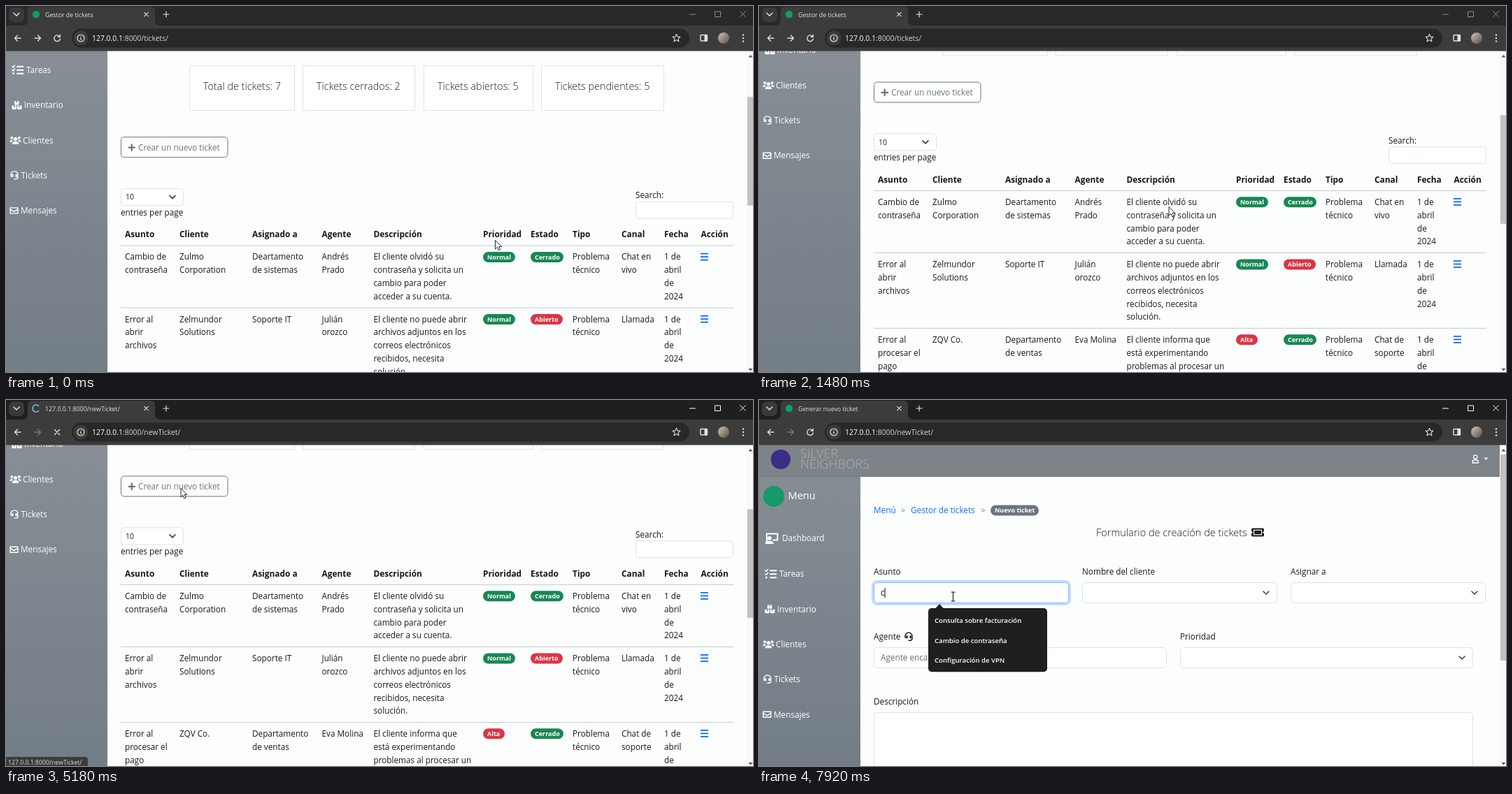
An HTML page for the animation above (7.99 s loop, 1068 by 524 pixels).

```html
<!DOCTYPE html>
<html lang="es">
<head>
<meta charset="utf-8">
<title>Gestor de tickets</title>
<style>
  html, body { margin: 0; width: 100%; height: 100%; overflow: hidden; background: #fcfefe; }
  svg { display: block; width: 100vw; height: 100vh; }
  text { font-family: 'Open Sans', 'Noto Sans', sans-serif; white-space: pre; }
  .line { fill: none; stroke-linecap: round; stroke-linejoin: round; }
</style>
</head>
<body>
<svg id="stage" viewBox="0 0 1068 524"></svg>
<script>
const LOOP = 7990, NOTCH = 78.7, LINE = 18.9;
const INK = '#15181b', GRAY = '#6c757d', BLUE = '#0d6efd', GREEN = '#198754', RED = '#dc3545', BORDER = '#dee2e6';

// Drawing helpers; text is placed by the middle of its capitals.
const text = (x, y, s, size = 11.75, weight = 400, fill = INK) =>
  `<text x="${x}" y="${y + size * .36}" font-size="${size}" font-weight="${weight}" fill="${fill}">${s}</text>`;
const rect = (x, y, w, h, fill, r = 0, extra = '') =>
  `<rect x="${x}" y="${y}" width="${w}" height="${h}" rx="${r}" fill="${fill}" ${extra}/>`;
const line = (d, color, w = 1.2) => `<path class="line" d="${d}" stroke="${color}" stroke-width="${w}"/>`;
const shape = (d, fill) => `<path d="${d}" fill="${fill}"/>`;
const circle = (x, y, r, fill) => `<circle cx="${x}" cy="${y}" r="${r}" fill="${fill}"/>`;
const group = (id, body) => `<g id="${id}">${body}</g>`;
const at = (x, y, body) => `<g transform="translate(${x} ${y})">${body}</g>`;
const box = (x, y, w, h, r = 5, color = BORDER) =>
  rect(x + .5, y + .5, w - 1, h - 1, '#fff', r, `stroke="${color}"`);
const chevron = (x, y, color = '#343a40') => line(`M${x - 4} ${y - 2}l4 4 4-4`, color, 1.5);
const badge = (x, y, w, s, color) => rect(x, y - 7.5, w, 15, color, 7.5) + text(x + 6, y, s, 9, 700, '#fff');
const select = (x, y, w) => box(x, y, w, 30) + chevron(x + w - 16, y + 15);

// Icons, each drawn around its own centre.
const icon = {
  board: line('M-8 4v-10.500h15.500v9h-6', '#fff', 2) + circle(-4, 0, 3, '#fff') + shape('M-10 8q0-4 4-4h4q4 0 4 4z', '#fff'),
  tasks: line('M-1-4.800h8.500M-1 .2h8.500M-1 5.200h8.500', '#fff', 1.9) +
    line('M-8-5l1.300 1.300 2.400-2.800M-8 0l1.300 1.300 2.400-2.800', '#fff', 1.5) + circle(-6.500, 5, 1.500, '#fff'),
  boxes: rect(-3.500, -6, 6.500, 5.500, '#fff', 1) + rect(-7, .5, 6.500, 5.500, '#fff', 1) + rect(.5, .5, 6.500, 5.500, '#fff', 1) +
    shape('M-1-6h1.500v2.500h-1.500zM-4.500 .5h1.500v2.500h-1.500zM3 .5h1.500v2.500h-1.500z', '#7b838b'),
  users: circle(0, -2, 2.600, '#fff') + circle(-5.300, -3.500, 2, '#fff') + circle(5.300, -3.500, 2, '#fff') +
    shape('M-4.700 5.500q0-4 3.500-4h2.400q3.500 0 3.500 4zM-8 2.500q0-3 2.500-3h2l-2 3zM8 2.500q0-3-2.500-3h-2l2 3z', '#fff'),
  headset: c => line('M-5 1.500v-2.500a5 5 0 0 1 10 0v3.500q0 2.700-3 2.700h-2', c, 1.400) + rect(-3.800, -2, 2.300, 4.600, c, 1) + rect(1.500, -2, 2.300, 4.600, c, 1),
  mail: line('M-5.500-4h11v8h-11zM-5.500-2l5.500 3.500 5.500-3.500', '#fff', 1.400),
  ticket: rect(-9, -6, 18, 12, '#15181b', 2) + rect(-5.500, -3.300, 11, 6.600, 'none', 0, 'stroke="#fff" stroke-width="1.200"') +
    circle(-9, 0, 1.600, '#fff') + circle(9, 0, 1.600, '#fff'),
};

const sidebar = () => {
  const items = [
    ['Dashboard', 33, 198, 19, icon.board], ['Tareas', 29, 249, 17, icon.tasks],
    ['Inventario', 26, 299.3, 15.500, icon.boxes], ['Clientes', 24, 349.700, 13.500, icon.users],
    ['Tickets', 21.500, 400, 12, icon.headset('#fff')], ['Mensajes', 21, 450.300, 11.500, icon.mail],
  ];
  return circle(21, 138, 15, '#159a68') + text(41.500, 137, 'Menu', 14.600, 400, '#fff') +
    items.map(([name, x, y, ix, art]) => at(ix, y, art) + text(x, y, name, 11.75, 400, '#fff')).join('');
};

const topBar = rect(0, 64, 1059, 46, '#7c8389') + rect(0, 109, 1059, 1, '#737a81') +
  circle(31, 85, 14, '#3b2d83') +
  text(59, 77, 'SILVER', 18, 300, '#b3aea9') + text(59, 92, 'NEIGHBORS', 18, 300, '#b3aea9') +
  line('M1020 90v-1q0-3 3-3h2.500q3 0 3 3v1z', '#fff', 1.300) +
  `<circle cx="1024.200" cy="81.500" r="2.700" fill="none" stroke="#fff" stroke-width="1.300"/>` +
  shape('M1036.500 82.500h6l-3 3.200z', '#fff');

const crumbs = text(164, 158, 'Menú', 11.75, 400, BLUE) + text(203, 158, '&gt;', 11, 400, GRAY);

// Ticket list page
const columns = [170, 248, 352, 451.500, 525.500, 682, 750, 810, 880, 941, 993.500];
const headers = ['Asunto', 'Cliente', 'Asignado a', 'Agente', 'Descripción', 'Prioridad', 'Estado', 'Tipo', 'Canal', 'Fecha', 'Acción'];
const normal = ['Normal', 46, GREEN], high = ['Alta', 31, RED], closed = ['Cerrado', 47, GREEN], open = ['Abierto', 46, RED];
const kind = 'Problema|técnico', date = '1 de|abril|de|2024';
const rows = [
  [516.600, 'Cambio de|contraseña', 'Zulmo|Corporation', 'Deartamento|de sistemas', 'Andrés|Prado',
    'El cliente olvidó su|contraseña y solicita un|cambio para poder|acceder a su cuenta.', normal, closed, kind, 'Chat en|vivo', date],
  [605.700, 'Error al|abrir|archivos', 'Zelmundor|Solutions', 'Soporte IT', 'Julián|orozco',
    'El cliente no puede abrir|archivos adjuntos en los|correos electrónicos|recibidos, necesita|solución.', normal, open, kind, 'Llamada', date],
  [713.600, 'Error al|procesar el|pago', 'ZQV Co.', 'Departamento|de ventas', 'Eva Molina',
    'El cliente informa que|está experimentando|problemas al procesar un', high, closed, kind, 'Chat de|soporte', date],
];
const cell = (value, x, y) => Array.isArray(value)
  ? badge(x, y + .3, value[1], value[0], value[2])
  : value.split('|').map((s, i) => text(x, y + i * LINE, s)).join('');
const menuLines = y => [-5, -.5, 4].map(d => rect(993, y + d - .5, 11, 1.800, BLUE)).join('');
const rule = y => rect(164, y, 876, 1, '#c6cacd');

const listPage = crumbs + badge(217, 158, 74, 'Gestor tickets', GRAY) +
  text(506.500, 190, 'Panel de gestor de tickets', 14.500, 300) + at(688, 190, icon.ticket) +
  [[262, 151, 'Total de tickets: 7'], [424, 161, 'Tickets cerrados: 2'], [597, 157, 'Tickets abiertos: 5'], [765, 176, 'Tickets pendientes: 5']]
    .map(([x, w, s]) => box(x, 242.400, w, 65, 0, '#dbe4e6') + text(x + 20, 272.500, s, 14.400, 300)).join('') +
  `<rect id="button" x="164.500" y="345.100" width="152.500" height="29" rx="4.500" stroke="${GRAY}"/>` +
  `<g id="buttonLabel">${line('M175.500 360h8.500M179.750 355.700v8.600', 'currentColor', 2.300)}${text(189, 360, 'Crear un nuevo ticket', 11.75, 400, 'currentColor')}</g>` +
  box(164, 418.500, 90, 25, 4) + text(171, 431, '10', 10.400) + chevron(238, 431) +
  text(164, 453, 'entries per page') + text(900, 428.500, 'Search:') + box(900, 437.300, 140, 25, 4) +
  headers.map((s, i) => text(columns[i], 484.400, s, 11.900, 700)).join('') +
  [500, 589, 697].map(rule).join('') +
  rows.map(([y, ...cells]) => cells.map((c, i) => cell(c, columns[i], y)).join('') + menuLines(y)).join('');

// New ticket page
const formPage = crumbs + text(217, 158, 'Gestor de tickets', 11.75, 400, BLUE) + text(317.500, 158, '&gt;', 11, 400, GRAY) +
  badge(331, 158, 69, 'Nuevo ticket', GRAY) +
  text(482, 190, 'Formulario de creación de tickets', 14.500, 300) + at(713, 189.500, icon.ticket) +
  text(164, 246, 'Asunto') + text(462, 246, 'Nombre del cliente') + text(760, 246, 'Asignar a') +
  box(164, 261, 279, 30) + select(462, 261, 279) + select(760, 261, 279) +
  text(164, 339, 'Agente') + at(214, 339, icon.headset(INK)) + text(602, 339, 'Prioridad') +
  box(164, 354, 419, 30) + text(174, 369, 'Agente encargado', 11.75, 400, '#666b70') + select(602, 354, 419) +
  text(164, 432, 'Descripción') + box(164, 447, 857, 120) +
  group('focus', rect(162.500, 259.500, 282, 33, '#fff', 6.500, 'stroke="#c2dbfe" stroke-width="3"') + box(164, 261, 279, 30, 5, '#86b7fe')) +
  group('hint', text(174, 276, 'Asunto', 11.75, 400, '#666b70')) +
  group('typed', text(174, 276, 'c') + rect(179.500, 269, 1, 14, '#000'));

const suggestions = ['Consulta sobre facturación', 'Cambio de contraseña', 'Configuración de VPN',
  'Error al abrir archivos', 'Error al procesar el pago', 'Solicitud de acceso'];
const popup = count => shape('M251.500 299l6.500-7 6.500 7z', '#1f1f1f') + rect(242, 298, 170, 6 + count * 28.400, '#1f1f1f', 5) +
  suggestions.slice(0, count).map((s, i) => text(251, 315.700 + i * 28.400, s, 9.600, 600, '#fff')).join('');

// Browser frame
const PALE = '#dfe1e3';
const star = Array.from({ length: 10 }, (_, i) => {
  const r = i % 2 ? 2.600 : 5.800, a = (i / 5 - .5) * Math.PI;
  return `${i ? 'L' : 'M'}${(958.500 + r * Math.cos(a)).toFixed(1)} ${(46 + r * Math.sin(a)).toFixed(1)}`;
}).join('') + 'z';
const cross = (x, y, r) => `M${x - r} ${y - r}l${2 * r} ${2 * r}m0 ${-2 * r}l${-2 * r} ${2 * r}`;
const browser = `<rect id="strip" width="1068" height="30"/>` +
  rect(4, 2, 22, 21, '#3a3a3a', 7) + chevron(15, 12, PALE) +
  shape('M23 28q8 0 8-8v-13q0-6 6-6h170q6 0 6 6v13q0 8 8 8z', '#3c3c3c') + rect(0, 28, 1068, 36.500, '#3c3c3c') +
  group('favicon', circle(43, 12, 5.200, '#149a67')) +
  `<path id="spinner" class="line" d="M48 12a5 5 0 1 1-10 0a5 5 0 1 1 10 0" stroke="#7ec4cf" stroke-width="1.600"/>` +
  `<text id="tabTitle" x="56" y="15.500" font-size="8.800" fill="${PALE}"></text>` +
  line(cross(200.500, 12, 2.700), PALE) + line('M225 12h8M229 8v8', PALE) +
  group('controls', line('M977.500 12h8M1014 8h7.500v7.500h-7.500z' + cross(1053.500, 11.500, 3.700), 'currentColor', 1)) +
  line('M21 46h-8.500m4-4l-4 4 4 4', PALE, 1.400) +
  group('forward', line('M41 46h8.500m-4-4l4 4-4 4', 'currentColor', 1.400)) +
  group('reload', line('M76.500 43.500a4.300 4.300 0 1 0 .9 3.500M77.300 41.300v3h-3', PALE, 1.400)) +
  group('stop', line(cross(73, 46, 3.500), PALE, 1.400)) +
  rect(94, 32.500, 883, 27, '#282828', 13.500) + circle(107, 46, 10.500, '#3c3c3c') +
  `<circle cx="107" cy="46" r="5" fill="none" stroke="${PALE}" stroke-width="1.200"/>` + line('M107 45.500v2.700M107 43.300v.1', PALE, 1.300) +
  `<text x="123" y="49.700" font-size="10.400" fill="#fff">127.0.0.1<tspan id="path" fill="#d0d2d4"></tspan></text>` +
  line(star, PALE, 1.100) +
  rect(993, 41.500, 9.500, 8.500, 'none', 1, `stroke="${PALE}" stroke-width="1.400"`) + rect(998.500, 41, 4.500, 9.500, PALE) +
  circle(1026, 46, 8, 'url(#portrait)') + [41.500, 46, 50.500].map(y => circle(1054, y, 1.200, PALE)).join('');

const scrollbar = rect(1059, 64, 9, 460, '#f9f9f9') + shape('M1061.500 73.500l3-3.500 3 3.500z', '#555') +
  shape('M1061.500 519l3 3.500 3-3.500z', '#555') + `<rect id="thumb" x="1060" width="8" fill="#c1c1c1"/>`;

document.getElementById('stage').innerHTML = `
  <defs>
    <linearGradient id="side" x2="0" y2="1"><stop stop-color="#878e95"/><stop offset="1" stop-color="#737d87"/></linearGradient>
    <linearGradient id="portrait" x2="1" y2="1"><stop stop-color="#cfc5b8"/><stop offset="1" stop-color="#5b4d42"/></linearGradient>
  </defs>` +
  rect(0, 0, 1068, 524, '#fcfefe') + rect(0, 64, 145, 460, 'url(#side)') +
  group('scroller', sidebar() + group('list', listPage) + group('form', formPage) + topBar) +
  scrollbar + group('longPopup', popup(6)) + group('shortPopup', popup(3)) +
  group('status', shape('M0 511h113q4 0 4 4v9h-117z', '#3c3c3c') + text(3, 519, '127.0.0.1:8000/newTicket/', 8.700, 400, '#d5d7d9')) +
  browser +
  group('arrow', `<path d="M0 0v12.500l2.900-2.700 2 4.500 2.200-1-2-4.300h4z" fill="#fff" stroke="#111" stroke-width=".9"/>`) +
  group('beam', line('M-2.500-6.500h1.800l.7.7.7-.7h1.800M0-5.800v11.600M-2.500 6.500h1.800l.7-.7.7.7h1.800', '#111', 1.100));

const el = id => document.getElementById(id);
const show = (id, on) => el(id).style.display = on ? '' : 'none';

// Pointer tip as [time, x, y]
const pointer = [[0, 699.500, 335.500], [150, 699.500, 335.500], [1000, 643, 287.500], [1140, 586, 287.500], [1940, 586, 287.500],
  [2080, 570, 289], [2200, 570, 289], [2970, 248.500, 126.500], [3160, 248.500, 126.500], [3300, 250, 126.500],
  [6180, 250, 126.500], [6560, 275, 296], [6650, 275, 296], [6900, 277.500, 281.500], [LOOP, 277.500, 281.500]];
function pointerAt(t) {
  const i = pointer.findIndex(p => p[0] > t), [t0, x0, y0] = pointer[i - 1], [t1, x1, y1] = pointer[i];
  const k = (t - t0) / (t1 - t0);
  return [x0 + (x1 - x0) * k, y0 + (y1 - y0) * k];
}

// Wheel notches as [time, notches from the top]
const wheel = [[0, 2], [570, 1], [640, 0], [1340, 1], [1410, 2], [1480, 3], [6020, 0]];

function draw(t) {
  const between = (a, b) => t >= a && t < b;
  const loading = between(3600, 6250), navigated = t >= 3600, form = t >= 6020;

  const notches = wheel.filter(w => w[0] <= t).pop()[1];
  el('scroller').setAttribute('transform', `translate(0 ${-notches * NOTCH})`);
  el('thumb').setAttribute('y', 78 + notches * 26.100);
  el('thumb').setAttribute('height', form ? 295 : 155.500);
  show('list', !form);
  show('form', form);

  const hover = Math.max(0, Math.min(1, (t - 3000) / 150, (4700 - t) / 150));
  el('button').setAttribute('fill', `rgba(108,117,125,${hover})`);
  el('buttonLabel').style.color = hover > .5 ? '#fff' : GRAY;

  show('focus', t >= 7100);
  show('hint', t < 7640);
  show('typed', t >= 7640);
  show('longPopup', between(7230, 7640));
  show('shortPopup', t >= 7640);
  show('status', between(3230, 5960));

  el('strip').setAttribute('fill', navigated ? '#1f1f1f' : '#292929');
  el('controls').style.color = navigated ? '#fff' : '#8f8f8f';
  el('forward').style.color = navigated ? '#7b7b7b' : PALE;
  el('path').textContent = navigated ? ':8000/newTicket/' : ':8000/tickets/';
  el('tabTitle').textContent = t < 3600 ? 'Gestor de tickets' : t < 5960 ? '127.0.0.1:8000/newTicket/' : 'Generar nuevo ticket';
  show('favicon', !loading);
  show('spinner', loading);
  show('reload', !loading);
  show('stop', loading);
  const turn = t < 5960 ? 45 - (t - 5180) * .36 : 180 + (t - 6080) * .5;
  el('spinner').setAttribute('transform', `rotate(${turn} 43 12)`);
  el('spinner').setAttribute('stroke-dasharray', t < 5960 ? '23 8.400' : '8 23.400');

  const [x, y] = pointerAt(t), overField = t >= 6860;
  show('arrow', !overField);
  show('beam', overField && !between(7640, 7920));
  for (const id of ['arrow', 'beam']) el(id).setAttribute('transform', `translate(${x} ${y})`);
}

const start = performance.now();
function tick() {
  draw((performance.now() - start) % LOOP);
  requestAnimationFrame(tick);
}
tick();
</script>
</body>
</html>
```
